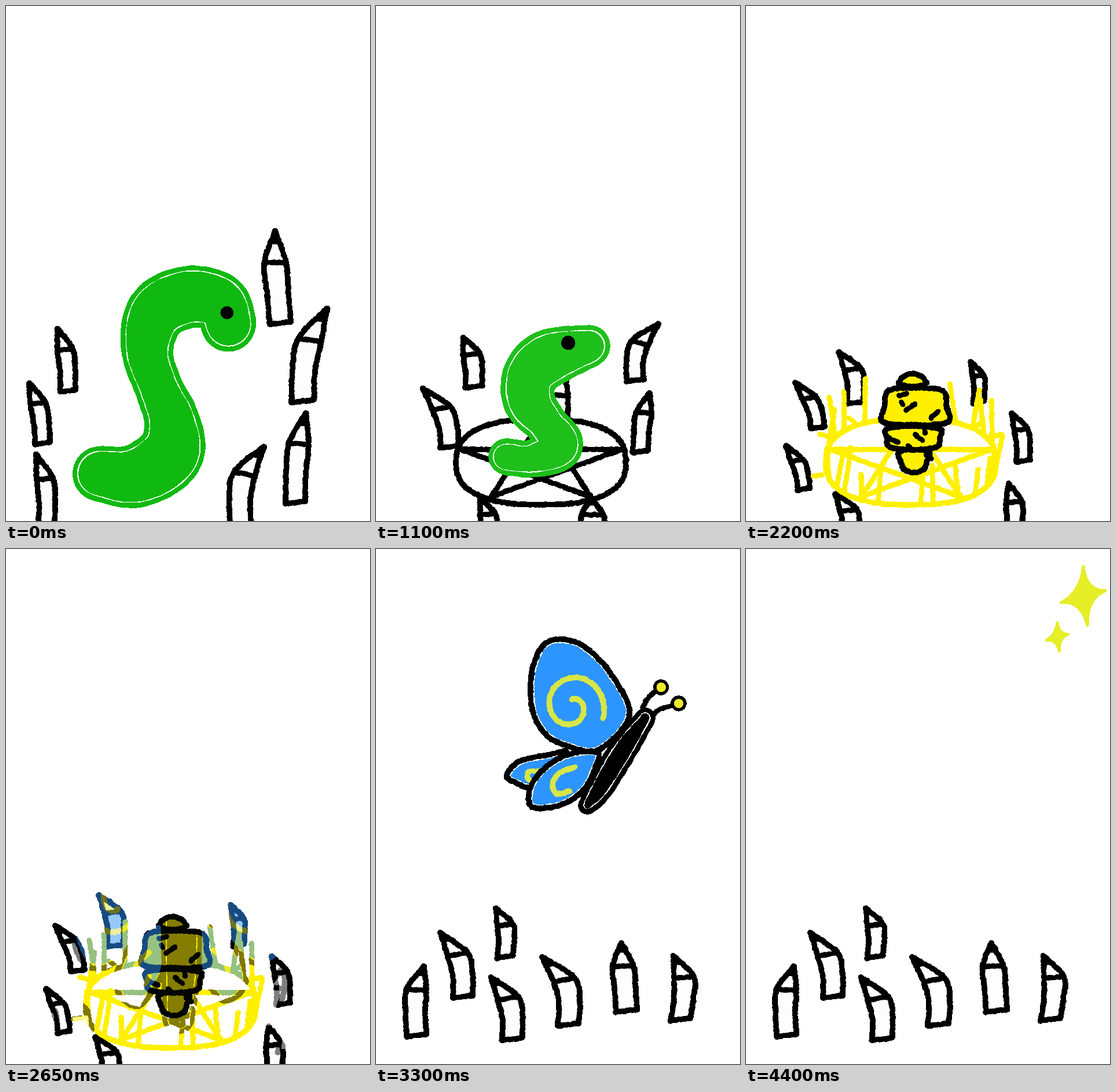
Recreate the animation shown at these times as an HTML page with a canvas. Size 629 px wide and 890 px high, loop 4850 ms.

```html
<!DOCTYPE html>
<html lang="en">
<head>
<meta charset="utf-8">
<title>Worm to butterfly</title>
<style>
html, body { margin: 0; width: 100%; height: 100%; overflow: hidden; background: #fff; }
canvas { display: block; width: 100vw; height: 100vh; }
</style>
</head>
<body>
<canvas id="stage" width="629" height="890"></canvas>
<script>
const W = 629, H = 890, HOLD = 450, STEP = 550, LOOP = 4850;
const BLACK = '#000', YELLOW = '#fff000', BLUE = '#2d95ff', LIME = '#d7e648', GLOW = '#e6ee28';
const GRASS = '#10b910', LEAF = '#1fbf1c';
const stage = document.getElementById('stage').getContext('2d');
let g, seed;

// Seeded value in -1..1
function jitter() {
  seed = (seed * 1664525 + 1013904223) >>> 0;
  return seed / 2147483648 - 1;
}

function spline(a, b, c, d, t) {
  const linear = c - a;
  const square = 2 * a - 5 * b + 4 * c - d;
  const cube = 3 * (b - c) + d - a;
  return b + 0.5 * t * (linear + t * (square + t * cube));
}

// Smooth curve through points of any dimension, sampled densely
function curve(points, closed) {
  const n = points.length, out = [];
  const at = i => closed ? points[(i + n) % n] : points[Math.max(0, Math.min(n - 1, i))];
  for (let i = 0; i < (closed ? n : n - 1); i++) {
    const a = at(i - 1), b = at(i), c = at(i + 1), d = at(i + 2);
    const steps = Math.max(1, Math.ceil(Math.hypot(c[0] - b[0], c[1] - b[1]) / 1.5));
    for (let j = 0; j < steps; j++) {
      out.push(b.map((v, k) => spline(a[k], v, c[k], d[k], j / steps)));
    }
  }
  if (!closed) out.push(points[n - 1]);
  return out;
}

// Uneven crayon dabs; radius(p) gives the size at each point
function dabs(points, radius, color, rough = 0.9) {
  g.fillStyle = color;
  for (const p of points) {
    g.beginPath();
    g.arc(p[0] + jitter() * rough, p[1] + jitter() * rough, radius(p) + jitter() * rough * 0.6, 0, 7);
    g.fill();
  }
}

const crayon = (points, width, color) => dabs(points, () => width / 2, color);
const line = (points, width, color) => crayon(curve(points), width, color);

function outline(points) {
  const path = new Path2D();
  points.forEach(p => path.lineTo(p[0], p[1]));
  path.closePath();
  return path;
}

function erase(draw) {
  g.save();
  g.globalCompositeOperation = 'destination-out';
  draw();
  g.restore();
}

// Filled shape with a thin unpainted gap inside its contour
function blob(points, fill, ink, gap = 3) {
  const edge = curve(points, true), path = outline(edge);
  g.fillStyle = fill;
  g.fill(path);
  if (gap) erase(() => { g.clip(path); crayon(edge, 9 + gap, BLACK); });
  crayon(edge, 9, ink);
}

// Body swept along a spine of [x, y, radius], with the same gap
function tube(spine, color) {
  const points = curve(spine);
  dabs(points, p => p[2] + 4, color);
  erase(() => dabs(points, p => p[2] - 4.5, BLACK));
  dabs(points, p => p[2] - 6, color);
}

function dot(x, y, r, color) {
  dabs(Array(40).fill([x, y]), () => r - 0.5, color, 1.2);
}

function spiral(cx, cy, from, to, start, sweep, squeeze) {
  const points = Array.from({ length: 30 }, (_, i) => {
    const t = i / 29, r = from + (to - from) * t, a = start - sweep * t;
    return [cx + r * squeeze * Math.cos(a), cy + r * Math.sin(a)];
  });
  line(points, 9, LIME);
}

// Tip position, height, width, and sideways shift of shoulder and foot
function pencil([x, y, h, w, lean, foot]) {
  const tip = [x, y], waist = y + h * 0.34;
  const side = s => {
    const shoulder = [x + lean + s * w / 2, waist - s * lean * 0.1];
    const base = [x + foot + s * w / 2, y + h - s * 2];
    const middle = [(shoulder[0] + base[0]) / 2 + lean * 0.15, (shoulder[1] + base[1]) / 2];
    return [tip, shoulder, middle, base];
  };
  const left = side(-1), right = side(1);
  const near = p => [x + (p[0] - x) * 0.42, y + (p[1] - y) * 0.42];
  g.fillStyle = '#fdfdfd';
  g.fill(outline([...curve(left), ...curve(right).reverse()]));
  g.fillStyle = BLACK;
  g.fill(outline([tip, near(left[1]), near(right[1])]));
  line(left, 9, BLACK);
  line(right, 9, BLACK);
  line([left[3], right[3]], 9, BLACK);
  line([left[1], right[1]], 8.5, BLACK);
}

const meadow = [
  [465, 389, 159, 37, 0, 9], [555, 523, 160, 39, -30, -42], [518, 704, 154, 34, -12, -18],
  [446, 761, 140, 36, -34, -40], [89, 557, 108, 26, 13, 18], [40, 651, 105, 26, 15, 23],
  [52, 775, 125, 28, 15, 18]
];
const circle = [
  [325, 625, 140, 31, -9, -8], [151, 573, 85, 29, 14, 18], [81, 661, 101, 31, 32, 46],
  [488, 549, 98, 29, -32, -40], [473, 668, 102, 26, -10, -16], [180, 851, 80, 26, 13, 15],
  [372, 852, 80, 38, 2, 2]
];
const ritual = [
  [160, 598, 88, 28, 24, 28], [85, 651, 78, 23, 24, 39], [69, 760, 75, 21, 19, 31],
  [154, 843, 85, 28, 23, 26], [388, 615, 70, 19, 13, 14], [459, 704, 82, 23, 16, 20],
  [454, 825, 95, 27, 9, 9]
];
const crowd = [
  [52, 666, 82, 26, 18, 29], [45, 769, 90, 30, 23, 27], [104, 768, 103, 34, 22, 25],
  [481, 722, 106, 28, -14, -28], [520, 770, 98, 34, -19, -33], [579, 680, 71, 25, -14, -23],
  [586, 775, 95, 29, -9, -18]
];
const farewell = [
  [207, 621, 84, 27, 16, 16], [111, 663, 111, 34, 30, 39], [83, 721, 120, 34, -13, -13],
  [198, 740, 107, 35, 30, 37], [287, 705, 117, 36, 38, 45], [424, 681, 117, 36, 3, 9],
  [514, 703, 110, 34, 18, 12]
];

function tallWorm() {
  tube([[162, 808, 43], [225, 812, 50], [283, 775, 53], [287, 718, 43], [264, 660, 37],
    [244, 595, 40], [260, 530, 48], [314, 503, 49], [368, 512, 46], [385, 550, 43]], GRASS);
  dot(382, 530, 10, BLACK);
}

function shortWorm() {
  tube([[225, 779, 27], [270, 782, 28], [316, 760, 37], [294, 722, 33], [266, 685, 40],
    [266, 640, 43], [300, 608, 45], [368, 588, 32]], LEAF);
  dot(332, 582, 11, BLACK);
}

// Point on the boxy oval on the ground, scaled outward by k
function ground(a, k = 1) {
  const bend = v => Math.sign(v) * Math.abs(v) ** 0.8;
  return [285 + 147 * k * bend(Math.cos(a)), 788 + 74 * k * bend(Math.sin(a))];
}

function ring(color) {
  crayon(curve(Array.from({ length: 24 }, (_, i) => ground(i * Math.PI / 12)), true), 9, color);
}

function star(color) {
  const corner = i => {
    const a = -Math.PI / 2 + i * Math.PI * 0.4;
    return [285 + 146 * Math.cos(a), 789 + 73 * Math.sin(a)];
  };
  for (let i = 0; i < 5; i++) line([corner(i), corner(i + 2)], 8.5, color);
}

function goldCircle() {
  ring(YELLOW);
  star(YELLOW);
  for (const a of [-2.15, -2.65, 2.93, -0.85, -0.5]) line([ground(a, 1.06), ground(a, 1.18)], 8, YELLOW);
}

// Rays of light standing on the circle
function beams() {
  for (let i = 0; i < 24; i++) {
    const [x, y] = ground(i * Math.PI / 12 + jitter() * 0.08);
    line([[x, y], [x + jitter() * 12, y - 62 - jitter() * 18]], 8, YELLOW);
  }
}

function cocoon(fill, ink, gap) {
  const band = (x, top, w, bottom, v) => blob([
    [x, top - 2], [x + w / 2, top + 3], [x + (w + v) / 4 + 2, (top + bottom) / 2],
    [x + v / 2, bottom - 3], [x, bottom + 2], [x - v / 2, bottom - 3],
    [x - (w + v) / 4 - 2, (top + bottom) / 2], [x - w / 2, top + 3]
  ], fill, ink, gap);
  band(290, 768, 52, 804, 32);
  band(289, 728, 92, 765, 82);
  band(293, 662, 94, 722, 112);
  band(288, 637, 30, 656, 46);
}

function cracks() {
  for (let i = 0; i < 9; i++) {
    const x = 290 + jitter() * 30, y = 670 + i * 14;
    line([[x, y], [x + jitter() * 18, y + jitter() * 14]], 8, BLACK);
  }
}

function feeler(x0, y0, x, y) {
  line([[x0, y0], [x0 * 0.7 + x * 0.3, (y0 + y) / 2], [x, y]], 8, BLACK);
  dot(x, y, 12.5, BLACK);
  dot(x, y, 7, '#ecec2c');
}

function wingPair() {
  blob([[128, 430], [152, 447], [212, 506], [278, 574], [268, 644], [206, 700], [165, 725],
    [132, 712], [114, 665], [102, 570], [102, 490], [112, 445]], BLUE, BLACK);
  blob([[268, 644], [235, 662], [203, 705], [190, 745], [200, 776], [228, 790], [250, 768],
    [270, 735], [285, 690]], BLUE, BLACK);
  spiral(190, 608, 80, 15, -0.25, 11, 0.8);
  line([[247, 697], [228, 715], [222, 740], [238, 752], [248, 738]], 9, LIME);
}

function openButterfly() {
  wingPair();
  g.save();
  g.translate(605, 38);
  g.scale(-1, 0.94);
  wingPair();
  g.restore();
  tube([[303, 546, 17], [303, 620, 29], [303, 720, 30], [298, 812, 23]], '#0a0a02');
  feeler(296, 527, 265, 487);
  feeler(310, 524, 333, 480);
}

function flyingButterfly() {
  blob([[226, 391], [248, 367], [300, 355], [330, 352], [300, 390], [268, 412], [240, 403]], BLUE, BLACK);
  blob([[315, 156], [355, 166], [400, 208], [438, 285], [385, 347], [330, 340], [295, 322],
    [272, 285], [267, 235], [274, 195], [290, 166]], BLUE, BLACK);
  line([[280, 383], [264, 385], [262, 396], [272, 402]], 8, LIME);
  blob([[383, 352], [340, 353], [300, 372], [270, 405], [265, 440], [285, 448], [325, 440],
    [360, 415], [378, 380]], BLUE, BLACK);
  spiral(338, 272, 61, 12, 0.35, 8.2, 0.95);
  line([[344, 377], [318, 387], [305, 405], [312, 423], [335, 418]], 9, LIME);
  tube([[466, 291, 13], [425, 350, 20], [386, 415, 18], [365, 443, 11]], BLACK);
  feeler(461, 274, 493, 239);
  feeler(480, 285, 523, 267);
}

function sparkle(x, y, size) {
  const tips = [[0, -50], [38, -8], [7, 52], [-39, 13]].map(([u, v]) => [x + u * size, y + v * size]);
  g.fillStyle = g.strokeStyle = GLOW;
  g.lineWidth = 5;
  g.lineJoin = 'round';
  g.beginPath();
  g.moveTo(...tips[0]);
  tips.forEach(([u, v], i) => {
    const [p, q] = tips[(i + 1) % 4];
    g.quadraticCurveTo(x * 0.75 + (u + p) / 8, y * 0.75 + (v + q) / 8, p, q);
  });
  g.closePath();
  g.fill();
  g.stroke();
}

const scenes = [
  () => { meadow.forEach(pencil); tallWorm(); },
  () => {
    g.translate(8, 22);
    g.scale(0.97, 0.97);
    circle.forEach(pencil);
    ring(BLACK);
    shortWorm();
  },
  () => { circle.forEach(pencil); ring(BLACK); star(BLACK); shortWorm(); },
  () => { ritual.forEach(pencil); goldCircle(); cocoon(LEAF, LEAF, 3); },
  () => {
    ritual.forEach(pencil);
    goldCircle();
    beams();
    cocoon(YELLOW, BLACK, 0);
    cracks();
  },
  () => { openButterfly(); crowd.forEach(pencil); },
  () => { farewell.forEach(pencil); flyingButterfly(); },
  () => {
    farewell.forEach(pencil);
    g.translate(324, 37);
    g.scale(0.45, 0.45);
    flyingButterfly();
  },
  () => { farewell.forEach(pencil); sparkle(583, 80, 1); sparkle(538, 151, 0.48); }
];

function layer() {
  const c = document.createElement('canvas');
  c.width = W;
  c.height = H;
  return c;
}

// Paint a scene once and make its edges hard
function paint(draw) {
  const c = layer();
  g = c.getContext('2d');
  seed = 7;
  draw();
  const img = g.getImageData(0, 0, W, H);
  for (let i = 3; i < img.data.length; i += 4) img.data[i] = img.data[i] > 127 ? 255 : 0;
  g.putImageData(img, 0, 0);
  return c;
}

// The next scene tints only what is already painted
function blend(now, next) {
  const c = layer(), x = c.getContext('2d');
  x.drawImage(now, 0, 0);
  x.globalCompositeOperation = 'source-atop';
  x.globalAlpha = 0.5;
  x.drawImage(next, 0, 0);
  return c;
}

const stills = scenes.map(paint);
const fades = stills.slice(1).map((next, i) => blend(stills[i], next));
const start = performance.now();

function frame() {
  const t = Math.max(0, performance.now() - start) % LOOP;
  const k = Math.floor(t / STEP);
  stage.fillStyle = '#fff';
  stage.fillRect(0, 0, W, H);
  stage.drawImage(t % STEP < HOLD ? stills[k] : fades[k], 0, 0);
  requestAnimationFrame(frame);
}
frame();
</script>
</body>
</html>
```
